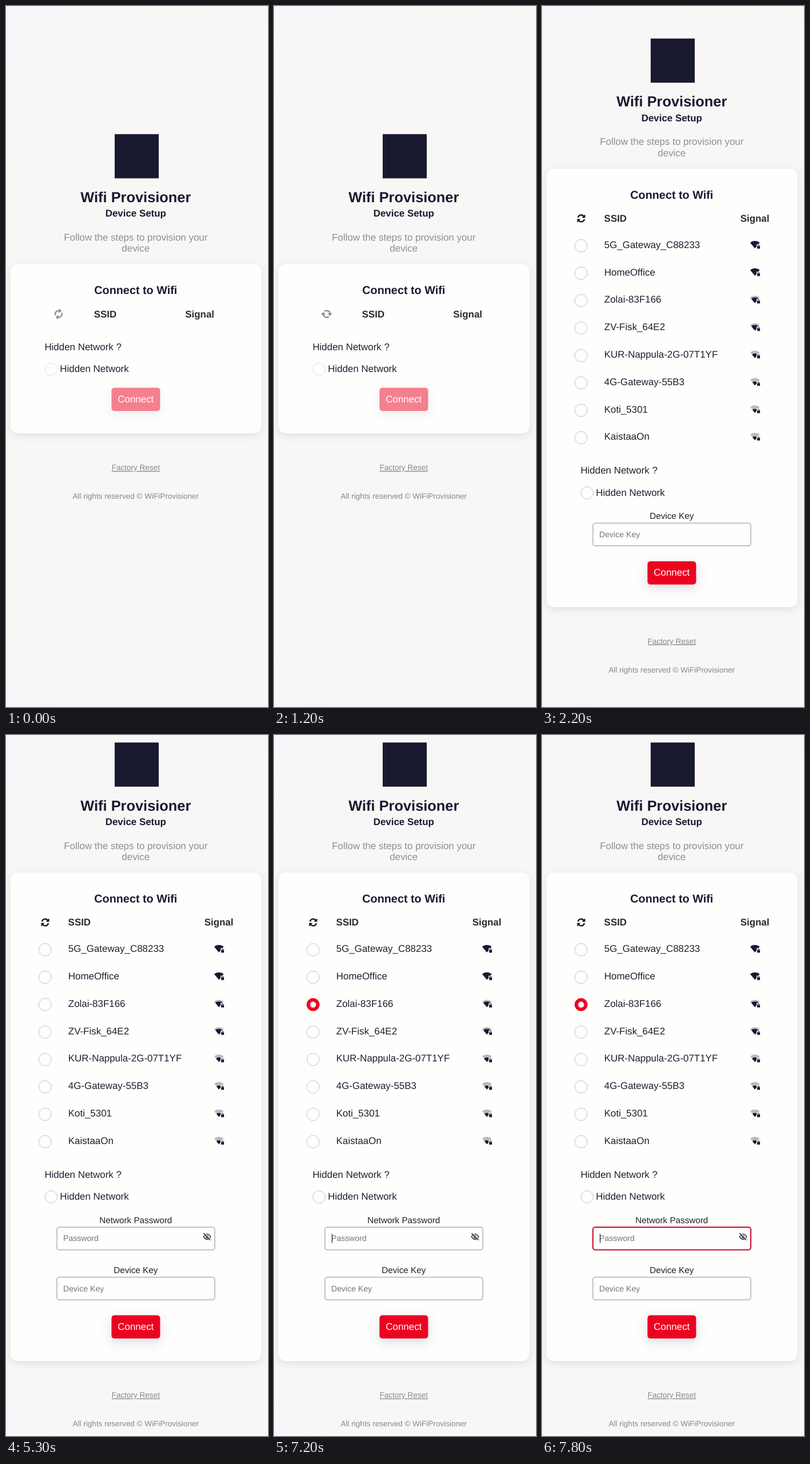
Animation of 458x1222 px, one loop 8000 ms. Source, as an HTML page:

```html
<!DOCTYPE html>
<html lang="en">
<head>
<meta charset="utf-8">
<title>Wifi Provisioner</title>
<style>
html, body { margin: 0; width: 100%; height: 100%; overflow: hidden; background: #f8f7f6; }
svg { display: block; }
text { font: 16.93px "Liberation Sans", Arial, sans-serif; fill: #1f2030; text-rendering: geometricPrecision; }
.mid { text-anchor: middle; }
.bold { font-weight: bold; fill: #191a30; }
.title { font-size: 25.4px; }
.heading { font-size: 19.81px; }
.head { fill: #2a2a32; }
.muted { fill: #8e8e94; }
.small { font-size: 13.54px; fill: #86868a; }
.label { font-size: 15.24px; fill: #222228; }
.hint { font-size: 14.1px; fill: #757575; }
.link { text-decoration: underline; }
.card { fill: #fefefd; filter: drop-shadow(0 4px 7px rgba(20, 20, 40, .1)); }
.ring { fill: #fefefe; stroke: #c3c3c5; }
.box { fill: #fefefe; stroke: #c4c4c4; stroke-width: 2; }
.button { fill: #eb0420; filter: drop-shadow(0 6px 10px rgba(25, 26, 48, .15)); }
</style>
</head>
<body>
<svg id="stage" width="458" height="1222" viewBox="0 0 458 1222">
  <defs>
    <radialGradient id="lilac"><stop offset="0" stop-color="#f7f6f9"/><stop offset="1" stop-color="#f7f6f9" stop-opacity="0"/></radialGradient>
    <radialGradient id="mint"><stop offset="0" stop-color="#f5f7f5"/><stop offset="1" stop-color="#f5f7f5" stop-opacity="0"/></radialGradient>
    <g id="arrow">
      <path d="M-5.7-1.5A5.9 5.9 0 0 1 4.4-3.9" fill="none" stroke="currentColor" stroke-width="2.4"/>
      <path d="M6.5-5.9V-1.6H2.2Z" fill="currentColor" stroke="currentColor" stroke-width="1.2" stroke-linejoin="round"/>
    </g>
    <g id="lock">
      <rect x="3" y="-.8" width="6.8" height="8.6" rx="1" fill="#fefefe"/>
      <rect x="3.9" y="2.4" width="5" height="4.6" rx=".6" fill="#191a30"/>
      <path d="M4.9 3V1.8a1.5 1.5 0 0 1 3 0V3" fill="none" stroke="#191a30"/>
    </g>
  </defs>
  <rect width="458" height="1222" fill="#f8f7f6"/>
  <ellipse cx="0" cy="0" rx="270" ry="270" fill="url(#lilac)"/>
  <ellipse cx="0" cy="1222" rx="120" ry="120" fill="url(#lilac)"/>
  <ellipse cx="458" cy="0" rx="230" ry="70" fill="url(#mint)"/>

  <rect id="card" class="card" x="7.8" width="438.6" rx="13"/>

  <g id="top">
    <rect x="190" y="56.7" width="77" height="77" fill="#191a30"/>
    <text class="mid bold title" x="226.8" y="175.3">Wifi Provisioner</text>
    <text class="mid bold" x="226.8" y="200.8">Device Setup</text>
    <text class="mid muted" x="226.8" y="242.3">Follow the steps to provision your</text>
    <text class="mid muted" x="226.8" y="261.5">device</text>
    <text class="mid bold heading" x="226.8" y="335.7">Connect to Wifi</text>
    <text id="ssid" class="bold head" y="376.1">SSID</text>
    <text id="signal" class="bold head" y="376.1">Signal</text>
    <g id="sync"><use href="#arrow"/><use href="#arrow" transform="rotate(180)"/></g>
    <g id="rows"></g>
  </g>

  <g id="hidden">
    <text x="67.4" y="815.4">Hidden Network ?</text>
    <circle id="hiddenRing" class="ring" cx="78.9" cy="848.8" r="10.9"/>
    <text x="94.3" y="854">Hidden Network</text>
  </g>

  <g id="pass">
    <text class="mid label" x="226.8" y="850.5">Network Password</text>
    <rect id="passBox" class="box" x="89" y="858" width="276" height="39.4" rx="4"/>
    <text class="hint" x="100" y="882.3">Password</text>
    <path id="caret" d="M101.5 869.5V885.5" stroke="#111"/>
    <g transform="translate(351.5 874.6)" fill="none" stroke="#191a30" stroke-width="1.3" stroke-linecap="round">
      <path d="M-6.2 0Q-3.6-4.4 0-4.4T6.2 0Q3.6 4.4 0 4.4T-6.2 0Z"/>
      <circle r="2.1"/>
      <path d="M-4.6-6.2L6.4 5" stroke="#fefefe" stroke-width="1.4"/>
      <path d="M-5.6-5.6L5.6 5.6"/>
    </g>
  </g>

  <g id="key">
    <text class="mid label" x="226.8" y="894">Device Key</text>
    <rect class="box" x="89" y="901.6" width="276" height="39.4" rx="4"/>
    <text class="hint" x="100" y="926">Device Key</text>
  </g>

  <g id="bottom">
    <rect id="button" class="button" x="184.4" y="968" width="85" height="40.4" rx="5"/>
    <text class="mid" x="226.8" y="993.2" style="fill:#fff">Connect</text>
    <text class="mid small link" x="226.8" y="1111.8">Factory Reset</text>
    <text class="mid small" x="226.8" y="1161.6">All rights reserved © WiFiProvisioner</text>
  </g>
</svg>
<script>
const LOOP = 8000, STEP = 100;
const RED = '#eb0420', NAVY = '#191a30';
const $ = id => document.getElementById(id);

// name, signal reach
const networks = [
  ['5G_Gateway_C88233', 13], ['HomeOffice', 13], ['Zolai-83F166', 10], ['ZV-Fisk_64E2', 10],
  ['KUR-Nappula-2G-07T1YF', 8], ['4G-Gateway-55B3', 6.7], ['Koti_5301', 6.7], ['KaistaaOn', 6.7]
];
const CHOSEN = 2;

function fan(r, color) {
  const x = r * 0.64, y = 6.5 - r * 0.77;
  return `<path d="M0 6.5L${-x} ${y}A${r} ${r} 0 0 1 ${x} ${y}Z" fill="${color}"/>`;
}

$('rows').innerHTML = networks.map(([name, reach], i) => `
  <g transform="translate(0 ${416 + i * 47.8})">
    <circle class="ring" ${i === CHOSEN ? 'id="ring"' : ''} cx="68.3" cy="2" r="10.9"/>
    ${i === CHOSEN ? '<g transform="translate(68.3 2)"><circle id="dot" r="10.5" fill="#fff"/></g>' : ''}
    <text x="108.8" y="5.7">${name}</text>
    <g transform="translate(372.2 0)">${fan(13, '#b9b9bd')}${fan(reach, NAVY)}<use href="#lock"/></g>
  </g>`).join('');

// layouts: vertical shift of each block, card edges and header columns
const layouts = [
  { from: 0, top: 166.7, hidden: -215.6, bottom: -302.4, card: [450, 745], cols: [92, 153.7, 313.3], busy: true },
  { from: 2200, top: 0, hidden: 0, bottom: 0, card: [283.8, 1048], cols: [68.5, 108.6, 346.7] },
  { from: 5300, top: -43.6, hidden: -43.6, bottom: 43.6, card: [239.8, 1091.2], cols: [68.5, 108.6, 346.7], pass: true }
];

const shift = (id, y) => $(id).setAttribute('transform', `translate(0 ${y})`);
const show = (id, on) => $(id).setAttribute('visibility', on ? 'visible' : 'hidden');

function setLayout(s) {
  shift('top', s.top);
  shift('hidden', s.hidden);
  shift('key', s.bottom);
  shift('bottom', s.bottom);
  $('card').setAttribute('y', s.card[0]);
  $('card').setAttribute('height', s.card[1] - s.card[0]);
  $('ssid').setAttribute('x', s.cols[1]);
  $('signal').setAttribute('x', s.cols[2]);
  $('sync').style.color = s.busy ? '#8e8f9b' : NAVY;
  $('button').style.opacity = s.busy ? 0.5 : 1;
  $('hiddenRing').style.opacity = s.busy ? 0.5 : 1;
  show('rows', !s.busy);
  show('key', !s.busy);
  show('pass', s.pass);
}

// element, start, length, easing, first and last style
const fades = [
  ['ring', 5300, 300, 'ease', { fill: '#fefefe', stroke: '#c3c3c5' }, { fill: RED, stroke: RED }],
  ['dot', 5300, 200, 'ease', { opacity: 0 }, { opacity: 1 }],
  ['dot', 5300, 600, 'cubic-bezier(.2,.85,.32,1.2)', { transform: 'scale(.7)' }, { transform: 'scale(.5)' }],
  ['passBox', 7200, 600, 'ease', { stroke: '#c4c4c4' }, { stroke: '#c90c28' }]
].map(([id, delay, duration, easing, a, b]) => {
  const fade = $(id).animate([a, b], { delay, duration, easing, fill: 'both' });
  fade.pause();
  return fade;
});

let current;
function draw(time) {
  const t = Math.floor(time % LOOP / STEP) * STEP;
  const s = layouts.filter(l => l.from <= t).pop();
  if (s !== current) setLayout(current = s);
  const angle = s.busy ? t * 0.36 - 36 : 0;
  $('sync').setAttribute('transform', `translate(${s.cols[0]} 370.2) rotate(${angle})`);
  show('caret', t >= 7200);
  fades.forEach(f => f.currentTime = t);
}

const start = performance.now();
function tick() {
  draw(performance.now() - start);
  requestAnimationFrame(tick);
}
tick();
</script>
</body>
</html>
```
